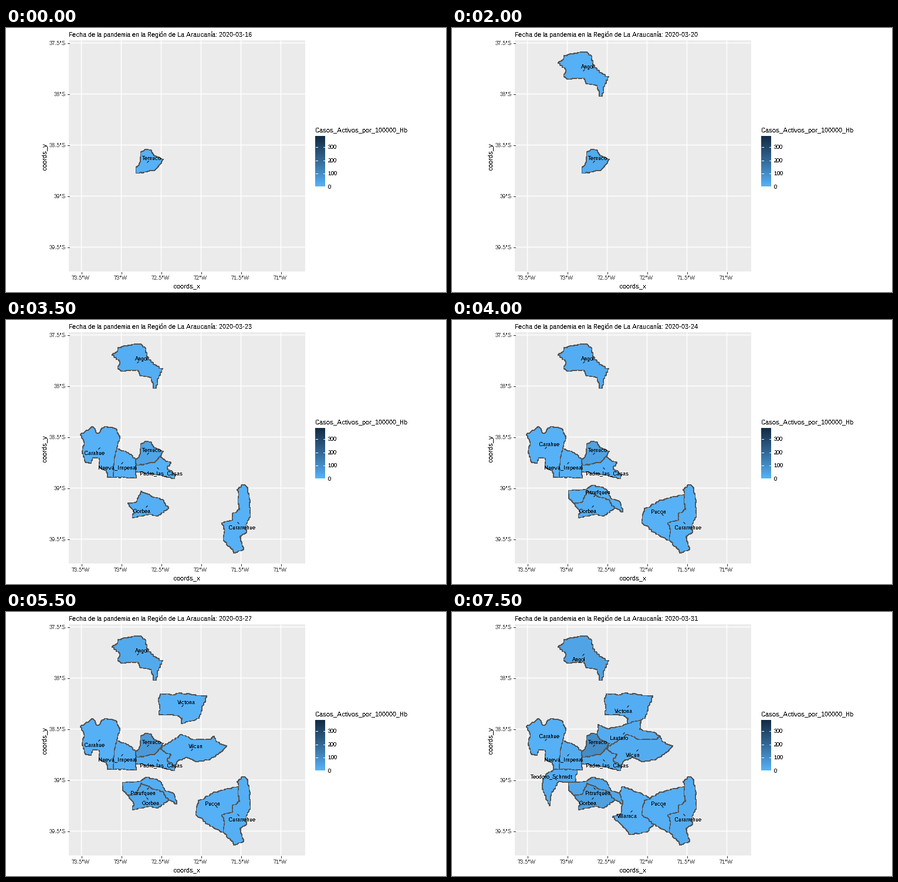
A matplotlib script that plays this animation: 750x450 px, repeating every 8000 ms.

```python
import math
import random

import matplotlib.pyplot as plt
from matplotlib.animation import FuncAnimation
from matplotlib.colors import LinearSegmentedColormap
from matplotlib.patches import Polygon, Rectangle

W, H, DAYS, STEP = 750, 450, 16, 500
PX = 0.72  # points per pixel at 100 dpi
V_MAX, GROWTH = 385, 1.6

plt.rcParams.update({
    "font.family": "Liberation Sans",
    "text.antialiased": False,
    "text.hinting": "native",
    "text.hinting_factor": 1,
})

ramp = LinearSegmentedColormap.from_list("cases", ["#56B1F7", "#336A98", "#132B43"])

fig = plt.figure(figsize=(W / 100, H / 100), dpi=100, facecolor="white")
ax = fig.add_axes([0, 0, 1, 1])
ax.set(xlim=(0, W), ylim=(H, 0))
ax.axis("off")


def text(x, y, s, px=9, color="black", **kw):
    return ax.text(x, y, s, fontsize=px * PX, color=color, **kw)


def line(x0, y0, x1, y1, color, **kw):
    style = dict(lw=PX, antialiased=False, solid_capstyle="butt", zorder=2) | kw
    return ax.plot([x0 + .5, x1 + .5], [y0 + .5, y1 + .5], color=color, **style)[0]


def box(x, y, w, h, color):
    ax.add_patch(Rectangle((x, y), w, h, fc=color, ec="none", antialiased=False))


# ---- borders shared by neighbours ----
TEM_EAST = [(247, 208), (252, 217), (268, 223)]
TEM_SOUTH = [(268, 223), (262, 232), (253, 242), (238, 245), (221, 247)]
GOR_NORTH = [(207, 312), (221, 310), (230, 291), (252, 302), (266, 305), (277, 320)]
CUR_WEST = [(396, 297), (395, 309), (398, 322), (385, 330), (386, 341), (367, 345),
            (372, 357), (370, 375)]
PUC_WEST = [(338, 317), (327, 321), (323, 345), (343, 361)]
PIT_EAST = [(284, 308), (290, 321), (290, 327)]
CAR_EAST = [(188, 219), (184, 235), (182, 268)]
IMP_SOUTH = [(182, 268), (205, 268), (221, 269)]
PAD_EAST = [(262, 232), (272, 240), (281, 243), (274, 252), (289, 263)]
VIL_NORTH = [(262, 232), (282, 219), (299, 208), (318, 217), (349, 216), (354, 211)]
VIC_SOUTH = [(321, 184), (298, 190)]

# ---- corners of each district ----
angol = [(180, 59), (188, 54), (191, 46), (227, 40), (238, 48), (239, 62), (261, 82),
         (267, 82), (258, 100), (256, 115), (251, 116), (247, 98), (228, 94), (224, 85),
         (195, 86), (190, 82), (194, 72), (187, 64)]
temuco = TEM_EAST + TEM_SOUTH + [(221, 240), (229, 225), (229, 211), (236, 207)]
gorbea = GOR_NORTH + [(258, 334), (245, 331), (225, 334), (215, 337), (217, 326)]
curarrehue = CUR_WEST + [(383, 389), (388, 397), (405, 390), (398, 369), (409, 362),
                         (409, 347), (416, 335), (414, 300), (410, 284), (404, 280),
                         (393, 289)]
pucon = PUC_WEST + [(364, 373)] + CUR_WEST[::-1] + [(371, 303), (353, 307)]
carahue = [(126, 195), (147, 181), (155, 193), (168, 181), (187, 185), (194, 199)] + \
    CAR_EAST + [(173, 268), (170, 256), (159, 251), (158, 235), (147, 234), (145, 243),
                (136, 243), (129, 225), (133, 209)]
imperial = CAR_EAST + IMP_SOUTH + [(221, 258), (221, 237), (208, 226)]
padre = TEM_SOUTH[:0:-1] + PAD_EAST + [(287, 270), (262, 264), (221, 258)]
pitrufquen = [(198, 303), (198, 290), (229, 288), (240, 281), (262, 288), (270, 303)] + \
    PIT_EAST + GOR_NORTH[::-1]
victoria = [(263, 139), (285, 141), (294, 138), (342, 143), (328, 181)] + VIC_SOUTH + \
    [(300, 181), (283, 174), (261, 175), (262, 158), (259, 151)]
vilcun = VIL_NORTH + [(359, 221), (376, 228), (363, 240), (348, 250), (325, 255),
                      (306, 247), (291, 255)] + PAD_EAST[::-1]
lautaro = [(249, 191), (264, 198), (290, 194)] + VIC_SOUTH[::-1] + \
    [(321, 193), (319, 200), (345, 205)] + VIL_NORTH[::-1] + TEM_EAST[::-1]
schmidt = IMP_SOUTH + [(213, 269), (209, 290), (181, 289), (169, 310), (166, 330),
                       (153, 300), (156, 280), (173, 268)]
villarrica = PUC_WEST + [(333, 374), (304, 379), (286, 360), (273, 349), (288, 343)] + \
    PIT_EAST[::-1] + [(290, 297), (318, 307)]


def rough(a, b):
    """Jagged edge; the same pair of ends always gives the same line."""
    p, q = sorted((a, b))
    rng = random.Random(f"{p}{q}")
    dx, dy = q[0] - p[0], q[1] - p[1]
    size = math.hypot(dx, dy)
    n = max(1, round(size / 3))
    pts = [p]
    for i in range(1, n):
        off = rng.uniform(-1.2, 1.2) / size
        pts.append((round(p[0] + dx * i / n - dy * off), round(p[1] + dy * i / n + dx * off)))
    pts.append(q)
    return pts if p == a else pts[::-1]


def outline(corners):
    ring = []
    for a, b in zip(corners, corners[1:] + corners[:1]):
        if a != b:
            ring += rough(a, b)[:-1]
    return [(x + .5, y + .5) for x, y in ring]


# label offset and pointer direction for each side of a centre
SIDES = {"ne": (7, -3, 1, -1), "nw": (-7, -2, -1, -1),
         "sw": (-8, 12, -1, 1), "se": (7, 12, 1, 1)}


class District:
    def __init__(self, name, corners, centre, start, peak, sides):
        self.centre, self.start, self.peak, self.sides = centre, start, peak, sides
        self.shape = Polygon(outline(corners), ec="#555555", lw=PX, antialiased=False,
                             joinstyle="bevel", zorder=3)
        ax.add_patch(self.shape)
        self.mark = line(0, 0, 0, 0, "black", antialiased=True, zorder=4)
        self.label = text(0, 0, name, ha="center", zorder=5)

    def show(self, day):
        for art in (self.shape, self.mark, self.label):
            art.set_visible(day >= self.start)
        if day < self.start:
            return
        t = (day - self.start + 1) / (DAYS - self.start)
        self.shape.set_facecolor(ramp(self.peak * t ** GROWTH / V_MAX))
        dx, dy, sx, sy = SIDES[self.sides[max(d for d in self.sides if d <= day)]]
        x, y = self.centre
        self.label.set_position((x + dx, y + dy))
        self.mark.set_data([x - sx + .5, x + 2 * sx + .5], [y - sy + .5, y + 2 * sy + .5])


# ---- panel and axes ----
box(107, 21, 403, 394, "#EBEBEB")
for i in range(6):
    x = 128 + 68 * i
    line(x, 21, x, 414, "white", lw=1.5 * PX, antialiased=True, snap=False)
    line(x, 415, x, 418, "#333333")
    text(x - 1, 429, f"{73.5 - i / 2:g}°W", color="#4D4D4D", ha="center")
for i in range(5):
    y = 25 + 87 * i
    line(107, y, 509, y, "white", lw=1.5 * PX, antialiased=True, snap=False)
    line(104, y, 107, y, "#333333")
    text(102, y + 4, f"{37.5 + i / 2:g}°S", color="#4D4D4D", ha="right")

text(308, 443, "coords_x", 11, ha="center")
text(71, 219, "coords_y", 11, rotation=90, ha="right", va="center")
title = text(107, 15, "", 11)

# ---- legend ----
text(527, 178, "Casos_Activos_por_100000_Hb", 11)
for i in range(86):
    box(527, 184 + i, 17, 1, ramp(1 - i / 85))
for value in range(0, 301, 100):
    y = round(269.7 - value * 0.2245)
    text(549, y + 4, str(value))
    line(527, y, 530, y, "white")
    line(540, y, 543, y, "white")

districts = [
    District("Angol", angol, (224, 72), 2, 36, {2: "ne", 6: "sw", 7: "ne", 14: "sw"}),
    District("Temuco", temuco, (241, 228), 0, 98,
             {0: "ne", 2: "sw", 3: "ne", 6: "sw", 7: "ne"}),
    District("Carahue", carahue, (159, 218), 7, 4, dict(zip(range(7, 13), ["sw", "ne"] * 3))),
    District("Nueva_Imperial", imperial, (198, 243), 7, 14, {7: "sw"}),
    District("Pitrufquen", pitrufquen, (242, 300), 8, 28,
             {8: "ne", 11: "sw", 12: "ne", 15: "se"}),
    District("Gorbea", gorbea, (240, 317), 5, 48, {5: "sw", 11: "se", 12: "sw"}),
    District("Padre_las_Casas", padre, (258, 252), 7, 20, {7: "se"}),
    District("Victoria", victoria, (300, 160), 10, 12, {10: "ne", 12: "sw"}),
    District("Lautaro", lautaro, (293, 206), 12, 15, {12: "ne", 15: "sw"}),
    District("Vilcun", vilcun, (316, 235), 9, 15, {9: "ne", 12: "sw"}),
    District("Pucon", pucon, (359, 332), 8, 6, {8: "nw"}),
    District("Curarrehue", curarrehue, (395, 345), 6, 14, {6: "sw", 7: "se"}),
    District("Villarrica", villarrica, (306, 339), 14, 4, {14: "sw"}),
    District("Teodoro_Schmidt", schmidt, (177, 285), 15, 12, {15: "nw"}),
]


def draw(day):
    title.set_text(f"Fecha de la pandemia en la Región de La Araucanía: 2020-03-{16 + day}")
    for d in districts:
        d.show(day)
    return []


anim = FuncAnimation(fig, draw, frames=DAYS, init_func=lambda: draw(0),
                     interval=STEP, repeat=True, repeat_delay=0, blit=False)
plt.show()
```
